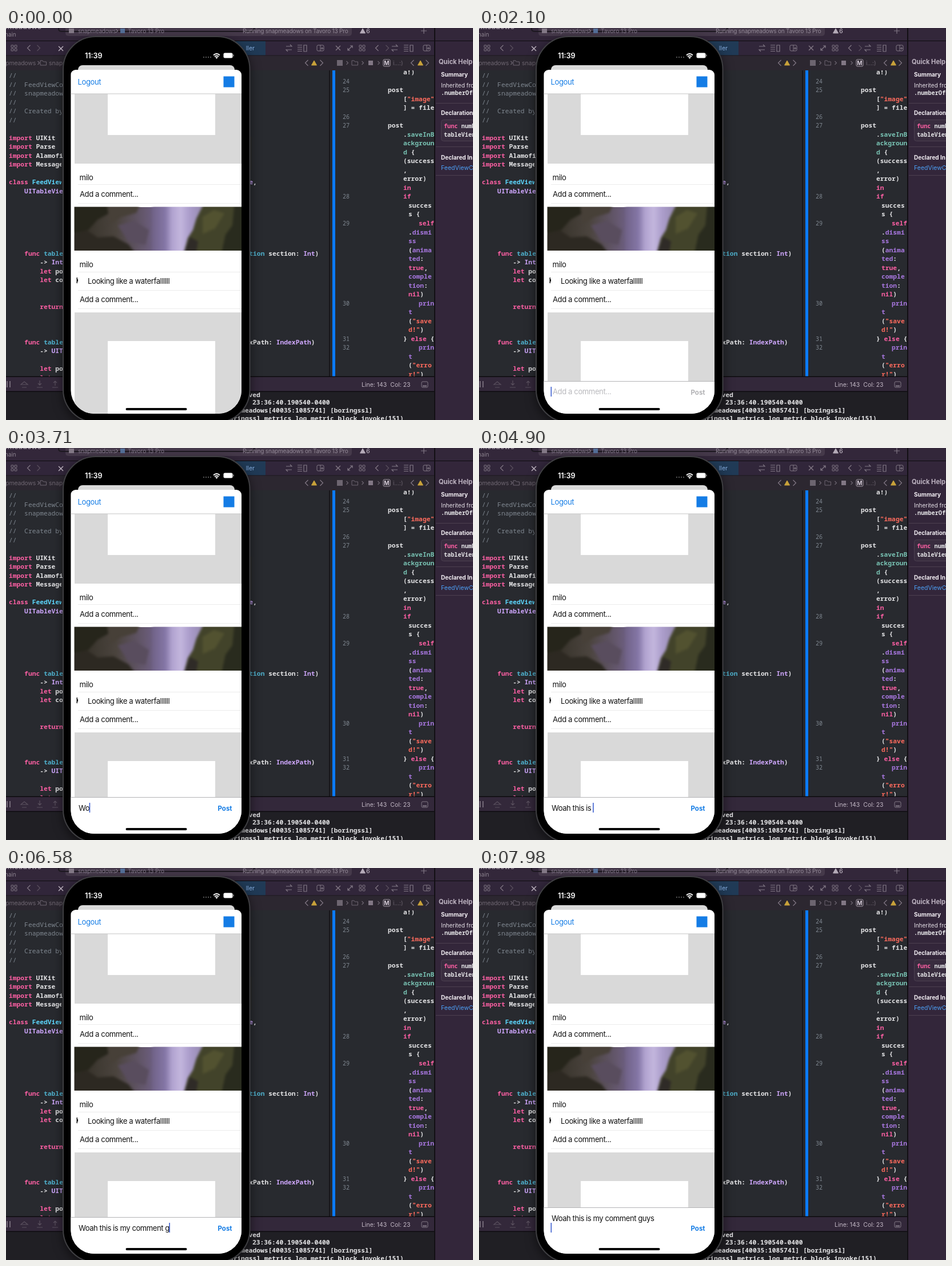
Recreate the animation shown at these times as an HTML page. Size 817 by 685 pixels, loop 8000 ms.

```html
<!DOCTYPE html>
<html lang="en">
<head>
<meta charset="utf-8">
<title>Comment bar</title>
<style>
html, body { margin: 0; width: 100%; height: 100%; overflow: hidden; background: #282a2f; }
svg { display: block; }
text { white-space: pre; font-family: Inter, "Open Sans", sans-serif; }
.code { font-family: "Noto Sans Mono", "DejaVu Sans Mono", monospace; font-size: 11.3px; font-weight: 600; }
.app { font-size: 13px; letter-spacing: -.36px; }
.typed { letter-spacing: -.42px; }
.shade { filter: drop-shadow(0 6px 9px rgba(0, 0, 0, .5)); }
.soft { filter: blur(2px); }
</style>
</head>
<body>
<svg id="stage" width="817" height="685" viewBox="0 0 817 685"></svg>
<script>
const LOOP = 8000, LINE = 15.53;
const MESSAGE = 'Woah this is my comment guys';
// [time, characters typed]; the last key is the line break
const KEYS = [[3480, 0], [4880, 13], [6540, 25], [6960, 28], [7300, 29]];
const INK = { p: '#fc5fa3', w: '#e4e4e6', g: '#7f8790', c: '#5dd8ff', f: '#4eb0cc',
              u: '#d0a8ff', v: '#a877e0', m: '#78c2b3', s: '#fc6a5d' };
const WEIGHT = { p: 700, g: 400 };

const rect = (x, y, w, h, fill, more = '') =>
  `<rect x="${x}" y="${y}" width="${w}" height="${h}" fill="${fill}" ${more}/>`;
const path = (d, stroke, width = 1.2, fill = 'none') =>
  `<path d="${d}" fill="${fill}" stroke="${stroke}" stroke-width="${width}"/>`;
const text = (x, y, s, fill, size, more = '') =>
  `<text x="${x}" y="${y}" fill="${fill}" font-size="${size}" ${more}>${s}</text>`;
const app = (x, y, s, fill = '#111', cls = '', more = '') =>
  `<text class="app ${cls}" x="${x}" y="${y}" fill="${fill}" ${more}>${s}</text>`;

// Parts are split by "|"; the first letter of each picks the ink.
function code(x, y, parts, more = '') {
  const spans = parts.split('|').map(p =>
    `<tspan fill="${INK[p[0]]}" font-weight="${WEIGHT[p[0]] || 600}">${p.slice(1).replace(/>/g, '&gt;')}</tspan>`);
  return `<text class="code" x="${x}" y="${y}" ${more}>${spans.join('')}</text>`;
}

const GREY = '#827885', DIM = '#5a505e', FAINT = '#6d6570';
const left = (x, y, c = GREY) => path(`M${x + 2.5} ${y - 5}l-5 5l5 5`, c);
const right = (x, y, c = GREY, r = 5) => path(`M${x - r / 2} ${y - r}l${r} ${r}l${-r} ${r}`, c);
const cross = (x, y, c = GREY) => path(`M${x - 4} ${y - 4}l8 8m0-8l-8 8`, c, 1.4);
const grid = (x, y) => [[-5, -5], [1, -5], [-5, 1], [1, 1]]
  .map(([a, b]) => rect(x + a, y + b, 4, 4, 'none', `stroke="${GREY}" rx=".5"`)).join('');
const swap = (x, y) => path(`M${x - 5} ${y - 3}h10l-3-3M${x + 5} ${y + 3}h-10l3 3`, GREY);
const rows = (x, y) => path(`M${x - 8} ${y - 5}h8m-8 3.5h8m-8 3.5h8m-8 3.5h8M${x + 3} ${y - 5}h5v11h-5z`, GREY);
const addPane = (x, y) => rect(x - 6, y - 5, 12, 10, 'none', `stroke="${GREY}" rx="2"`) +
  path(`M${x} ${y - 5}v10M${x + 3} ${y - 2}v5m-2.5-2.5h5`, GREY, 1);
const warn = (x, y, c) => path(`M${x} ${y - 4}l4.5 8h-9z`, c, 1, c);
const folder = (x, y) => path(`M${x - 5} ${y - 4}h4l1.5 2h5v6h-10.5z`, FAINT, 1);

function leftEditor() {
  const lines = {
    0: 'g//', 1: 'g//  FeedViewController.swift', 2: 'g//  snapmeadows', 3: 'g//',
    4: 'g//  Created by', 5: 'g//',
    7: 'pimport|w UIKit', 8: 'pimport|w Parse', 9: 'pimport|w AlamofireImage',
    10: 'pimport|w MessageInputBar',
    12: 'pclass|c FeedViewController|w: |uUIViewController|w, |uUITableViewDelegate|w,',
    13: 'u    UITableViewDataSource|w {',
    20: 'p    func|f tableView|w(_ tableView: |uUITableView|w, |fnumberOfRowsInSection|w section: |uInt|w)',
    21: 'w        -> |uInt|w {', 22: 'p        let|w post = posts', 23: 'p        let|w comments =',
    26: 'p        return|w comments',
    30: 'p    func|f tableView|w(_ tableView: |uUITableView|w, |fcellForRowAt|w indexPath: |uIndexPath|w)',
    31: 'w        -> |uUITableViewCell|w {', 33: 'p        let|w post = posts', 34: 'p        let|w comments ='
  };
  return Object.entries(lines).map(([n, s]) => code(5, 87 + n * LINE, s)).join('');
}

function rightEditor() {
  // x, code, line number
  const lines = [
    [695, 'wa!)'], [668, 'w', 24], [668, 'wpost', 25], [695, 'w[|s"image"'], [695, 'w] = file'],
    [668, 'w', 26], [668, 'wpost', 27], [695, 'w.|msaveInB'], [695, 'mackgroun'], [695, 'md|w {'],
    [695, 'w(success'], [695, 'w,'], [695, 'werror)'], [695, 'pin'], [695, 'pif', 28],
    [704, 'wsucces'], [704, 'ws {'], [722, 'pself', 29], [704, 'w.|vdismi'], [704, 'vss'],
    [704, 'w(|vanima'], [704, 'vted|w:'], [704, 'ptrue|w,'], [704, 'vcomple'], [704, 'vtion|w:'],
    [704, 'pnil|w)'], [722, 'vprin', 30], [704, 'vt'], [704, 'w(|s"save'], [704, 'sd!"|w)'],
    [695, 'w} |pelse|w {', 31], [722, 'vprin', 32], [704, 'vt'], [704, 'w(|s"erro'], [704, 'sr!"|w)']
  ];
  return lines.map(([x, s, n], i) => code(x, 81 + i * LINE, s) +
    (n ? code(601, 81 + i * LINE, 'g' + n, 'text-anchor="end" style="font-size:10px"') : '')).join('');
}

function toolbars() {
  return rect(0, 0, 817, 22, '#33273a') + rect(104, -8, 501, 22, '#45394a', 'rx="5"') +
    path('M92 0v2q0 4 6 4h330q6 0 6-4v-2', '#1d1820', 2) +
    text(62, 2, 'snapmeadows', '#988e9b', 12.5, 'font-weight="700" text-anchor="end"') +
    text(-5, 15, 'main', '#8a808d', 10) +
    rect(110, 1, 9, 8, GREY) + text(126, 8.5, 'snapmeadows', '#83798a', 10, 'letter-spacing="-.2"') +
    right(194, 5, GREY, 3) + rect(200, 1, 8, 8, '#55709a') +
    text(213, 8.5, 'Tavoro 13 Pro', '#83798a', 10) +
    text(414, 8.5, 'Running snapmeadows on Tavoro 13 Pro', '#938997', 10, 'letter-spacing="-.2"') +
    warn(624, 5, '#b5abb8') + text(630, 9, '6', '#c5bcc8', 11) +
    path('M726 5h10m-5-5v10', GREY) +
    // tabs
    rect(0, 22, 817, 1.5, '#0d0b0e') + rect(0, 23, 749, 25, '#31263a') +
    grid(14, 35) + left(40, 35) + right(57, 35, DIM) + cross(96, 36, '#c0b6c3') +
    rect(300, 23, 154, 25, '#203a56') + text(435, 39, 'ller', '#86aee0', 10.5, 'text-anchor="end"') +
    swap(495, 35) + rows(518, 35) + addPane(550, 35) +
    cross(581, 35) + path('M598 39l8-8m-4 0h4v4m-8 0v4h4', GREY) + grid(623, 35) +
    left(649, 35) + right(667, 35, DIM) + swap(680, 35) + rows(704, 35) + addPane(736, 35) +
    // path bars
    rect(0, 48, 749, 26, '#2c2730') + rect(0, 47.5, 749, 1, '#1c191f') +
    text(52, 65, 'snapmeadows', FAINT, 10.5, 'text-anchor="end" letter-spacing="-.2"') +
    right(57, 61, FAINT, 3) + folder(65, 61) + text(75, 65, 'snapmeadows', FAINT, 10.5) +
    left(526, 61) + warn(539, 61, '#c9a23a') + right(552, 61) +
    rect(579, 56, 10, 10, FAINT) + right(597, 61, FAINT, 3) + folder(610, 61) + right(624, 61, FAINT, 3) +
    rect(634, 57, 8, 8, GREY) + right(652, 61, FAINT, 3) +
    rect(660, 55, 12, 12, 'none', 'rx="2" stroke="#a79eaa"') +
    text(666, 65, 'M', '#d5ccd8', 10, 'font-weight="700" text-anchor="middle"') +
    text(677, 65, 'i...:)', FAINT, 10) +
    left(711, 61) + warn(725, 61, '#c9a23a') + right(737, 61);
}

function inspector() {
  const bold = (y, s) => text(761, y, s, '#f2eef3', 10, 'font-weight="700"');
  const rule = y => rect(752, y, 65, 1, '#4c4050');
  const small = 'style="font-size:10.2px"';
  return rect(751, 23, 66, 662, '#33263a') + rect(749, 0, 2, 685, '#120f14') +
    text(757, 63, 'Quick Help', '#bdb3c0', 11.1, 'font-weight="700"') +
    bold(85, 'Summary') + text(761, 103.5, 'Inherited from', '#e4dfe6', 10) +
    code(761, 117, 'w.numberOfRows', small) + rule(131) + bold(151.5, 'Declaration') +
    rect(761.5, 160.5, 70, 37, '#392d3f', 'rx="4" stroke="#4c4050"') +
    code(766, 175, 'pfunc|w number', small) + code(766, 189.5, 'wtableView', small) +
    rule(207) + bold(229.5, 'Declared In') + text(761, 248, 'FeedViewController', '#4c9ff5', 10.5) + rule(257);
}

function debugArea() {
  const log = (x, y, s) => code(x, y, 'w' + s);
  return rect(0, 609, 749, 27, '#33283a') + rect(0, 608.5, 749, 1.5, '#0d0b0e') +
    rect(0, 635, 749, 50, '#201f24') + rect(0, 634.5, 749, 1.5, '#0d0b0e') +
    path('M2 617v11m5-11v11', GREY, 1.6) + path('M26 623l6-5l6 5zM28 628h8', DIM) +
    path('M59 616v8m-3-3l3 3l3-3M54 628h10M86 625v-8m-3 3l3-3l3 3M81 628h10', DIM) +
    text(622, 626.5, 'Line: 143  Col: 23', '#c0b6c3', 10.5) +
    rect(727, 618, 11, 10, 'none', `rx="2" stroke="${GREY}"`) + rect(729, 624.5, 7, 2, GREY) +
    log(411, 645, 'saved') + log(431, 658, '23:36:40.190540-0400') +
    log(384, 672, 'snapmeadows[40035:1085741] [boringssl]') +
    log(384, 686, 'boringssl_metrics_log_metric_block_invoke(151)');
}

const waterfall = () => `<g clip-path="url(#photo)">` +
  rect(120, 313, 292, 76, 'url(#rock)') + '<g class="soft">' +
  rect(256, 305, 90, 92, 'url(#water)') +
  path('M110 303h80l-8 20l-22 12l-16 18l-34 8z', 'none', 0, '#26251b') +
  path('M110 362l32-8l18 12l28-2l26 14l16 20h-120z', 'none', 0, '#2d2922') +
  path('M176 305h60l-8 18l-28 8l-18 12z', 'none', 0, '#474038') +
  path('M196 345l28-8l26 16l-6 26l-30-6z', 'none', 0, '#594d5e') +
  path('M310 397l8-30l9-14l6-20l15-30h74v94z', 'none', 0, '#42432a') +
  path('M344 330l20-12l18 6l-16 26l-22 10z', 'none', 0, '#525230') +
  path('M376 397l8-36l12-16l4-42h22v94z', 'none', 0, '#292b1e') +
  path('M310 397l12-32l14 8l-4 24z', 'none', 0, '#2f2b27') + '</g></g>';

function phone() {
  const rule = y => rect(126, y, 286, 1, '#ececec');
  const comment = y => app(129, y, 'Add a comment...');
  return rect(97, 122, 3, 28, '#2b2b2d') + rect(97, 172, 3, 48, '#2b2b2d') + rect(97, 232, 3, 48, '#2b2b2d') +
    rect(426, 190, 4, 58, '#2b2b2d') +
    rect(100, 15, 326.5, 674, '#000', 'rx="57" stroke="#3f3f42" stroke-width="2" class="shade"') +
    text(138, 52.5, '11:39', '#fff', 12.5, 'font-weight="600"') +
    [346, 350, 354, 358].map(x => rect(x - 1, 50, 2, 2, '#555')).join('') +
    path('M363 47.5q5.5-5 11 0M365 50q3.5-3 7 0', '#fff', 1.8) + path('M366.5 51.5q2-1.5 4 0l-2 2z', '#fff', .5, '#fff') +
    rect(380.5, 43.5, 16, 9, '#fff', 'rx="2.5"') + rect(397.3, 46.5, 1.3, 3, '#aaa') +
    `<g clip-path="url(#screen)">` +
    rect(126, 65, 274, 30, '#d9d9d9', 'rx="8"') + rect(113, 73, 299, 640, '#fff', 'rx="9"') +
    app(125.5, 98.5, 'Logout', '#147ce5') + rect(380.5, 84.5, 19, 19, '#147ce5') +
    rect(120, 115, 292, 122, '#d9d9d9') + rect(178, 115, 188, 72, '#fff') + rect(113, 114.5, 299, 1, '#c6c6c6') +
    app(128.5, 265.5, 'milo') + rule(273) + comment(294.5) + rule(306) +
    waterfall() +
    app(128.5, 418, 'milo') + rule(426) +
    rect(123.5, 436, 1.5, 10, '#111') + rect(125, 439, 1, 4, '#111') +
    app(143, 446.5, 'Looking like a waterfallllll') + rule(458) + comment(479) + rule(490) +
    rect(120, 497, 292, 180, '#d9d9d9') + rect(178, 547, 188, 130, '#fff') +
    `<g id="bar">` + rect(113, 0, 299, 120, '#fff') + rect(113, 0, 299, 1, '#b4b4b6') +
    app(129, 23.5, 'Add a comment...', '#b9b9bd', '', 'id="hint"') +
    app(127, 23.5, '', '#111', 'typed', 'id="typed"') +
    text(370.5, 24, 'Post', '#147ce5', 11.5, 'id="post" font-weight="700"') +
    rect(125.5, 10, 1.6, 17, '#3d5fd0', 'id="caret"') + '</g></g>' +
    rect(209.5, 664, 107, 4, '#000', 'rx="2"');
}

const stage = document.getElementById('stage');
const stops = list => list.map(([o, c]) => `<stop offset="${o}" stop-color="${c}"/>`).join('');
stage.innerHTML = `<defs>
  <clipPath id="screen"><rect x="113.4" y="28" width="298.6" height="646" rx="41"/></clipPath>
  <clipPath id="photo"><rect x="119.5" y="312.5" width="292.5" height="76.5"/></clipPath>
  <clipPath id="edit1"><rect x="0" y="74" width="565" height="535"/></clipPath>
  <clipPath id="edit2"><rect x="576" y="74" width="173" height="535"/></clipPath>
  <linearGradient id="rock">${stops([[0, '#302d24'], [.25, '#4b443e'], [.42, '#65586f'], [.55, '#77699a'], [1, '#35351f']])}</linearGradient>
  <linearGradient id="water">${stops([[0, '#706287'], [.25, '#8476a6'], [.38, '#b0a2cf'], [.55, '#c3b6dd'], [.72, '#ab9dcb'], [1, '#9488ad']])}</linearGradient>
  </defs>` +
  rect(0, 0, 817, 685, '#282a2f') +
  `<g clip-path="url(#edit1)">${leftEditor()}</g><g clip-path="url(#edit2)">${rightEditor()}</g>` +
  rect(565, 23, 2, 586, '#17161a') + rect(571, 74, 5, 535, '#0b7bfa') +
  toolbars() + debugArea() + inspector() + phone();

const [bar, hint, typed, post, caret] = ['bar', 'hint', 'typed', 'post', 'caret'].map(id => document.getElementById(id));

function typedCount(t) {
  for (let i = 1; i < KEYS.length; i++) {
    const [t0, n0] = KEYS[i - 1], [t1, n1] = KEYS[i];
    if (t < t1) return Math.max(0, Math.floor(n0 + (n1 - n0) * (t - t0) / (t1 - t0)));
  }
  return KEYS[KEYS.length - 1][1];
}

function draw(t) {
  const n = typedCount(t), broken = n > MESSAGE.length;
  const slide = t < 1930 ? 90 : 68 * Math.exp((1930 - t) / 75);
  const top = broken ? 593 : 610 + slide;
  bar.setAttribute('transform', `translate(0 ${top.toFixed(2)})`);
  hint.style.display = n ? 'none' : '';
  typed.textContent = MESSAGE.slice(0, n);
  post.setAttribute('fill', n ? '#147ce5' : '#b2b2b5');
  post.setAttribute('y', broken ? 41 : 24);
  const x = n && !broken ? 127 + typed.getComputedTextLength() : 126;
  caret.setAttribute('x', (x - .5).toFixed(2));
  caret.setAttribute('y', broken ? 27 : 10);
  caret.style.opacity = !n && (t - 2100) % 1000 > 600 ? 0 : 1;
}

function tick(now) {
  draw(now % LOOP);
  requestAnimationFrame(tick);
}
draw(0);
requestAnimationFrame(tick);
</script>
</body>
</html>
```
